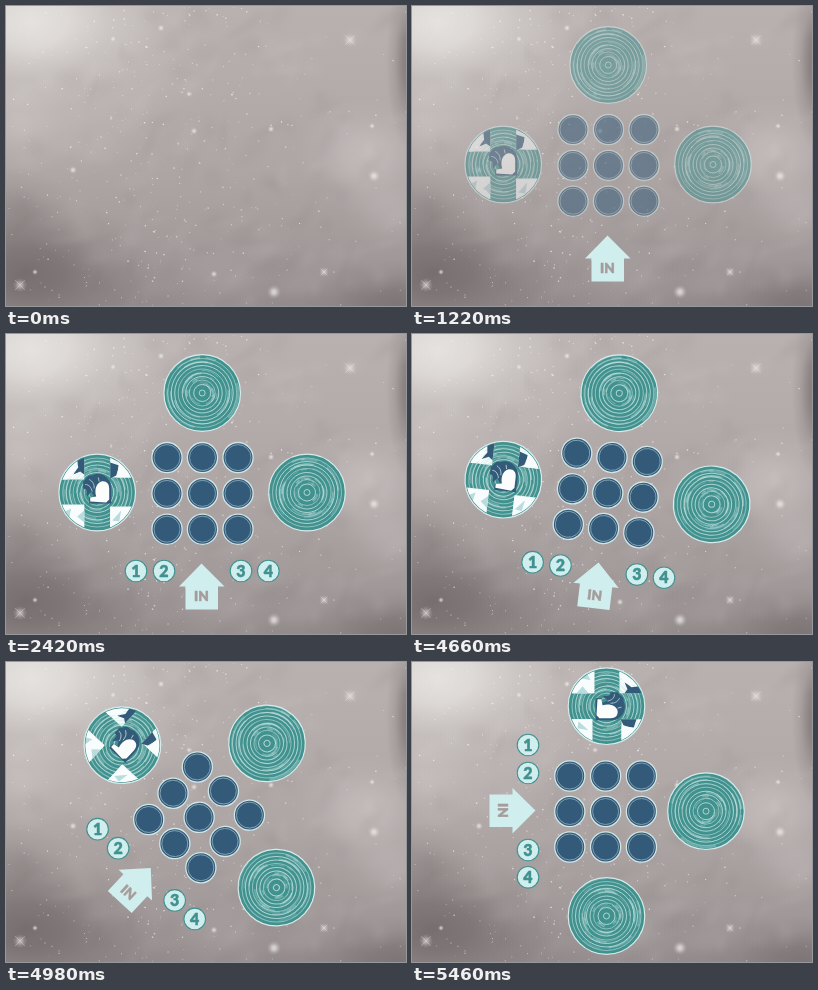
Write an HTML page with a canvas that moves like this. It is 400x300 px and loops after 8 s.

```html
<!DOCTYPE html>
<html lang="en">
<head>
<meta charset="utf-8">
<title>Turning board</title>
<style>
  html, body { margin: 0; width: 100%; height: 100%; overflow: hidden; background: #aca4a4; }
  canvas, svg { position: absolute; left: 0; top: 0; width: 100%; height: 100%; display: block; }
  text { font-family: Lato, "Open Sans", sans-serif; font-weight: 900; text-anchor: middle; }
</style>
</head>
<body>
<canvas id="sky" width="400" height="300"></canvas>
<svg id="stage" viewBox="0 0 400 300">
  <defs><clipPath id="disc"><circle r="38.3"/></clipPath></defs>
  <g id="board">
    <g id="discs"></g>
    <g id="arrow">
      <path d="M195.5 229.5L218.5 252.5H212V275.5H179.5V252.5H173Z" fill="#d0eeed"/>
      <text x="195.5" y="267.4" font-size="13.6" fill="#a59c9c" stroke="#a59c9c" stroke-width="0.4">IN</text>
    </g>
    <g id="labels"></g>
  </g>
</svg>
<script>
const LOOP = 8000, STEP = 80, OFFSET = 500;
const PIVOT = [200, 153];
const TEAL = '#41918f', NAVY = '#335a78', PALE = '#d0eeed';
const $ = id => document.getElementById(id);

function randomizer(seed) {
  return () => (seed = (seed * 16807) % 2147483647) / 2147483647;
}

function add(parent, tag, attrs) {
  const node = document.createElementNS('http://www.w3.org/2000/svg', tag);
  for (const key in attrs) node.setAttribute(key, attrs[key]);
  return parent.appendChild(node);
}

function paintSky() {
  const ctx = $('sky').getContext('2d');
  const rnd = randomizer(4711);

  const base = ctx.createLinearGradient(0, 0, 0, 300);
  base.addColorStop(0, '#b9b1b0');
  base.addColorStop(0.55, '#aea5a5');
  base.addColorStop(1, '#9a9292');
  ctx.fillStyle = base;
  ctx.fillRect(0, 0, 400, 300);

  function cloud(x, y, rx, ry, rgb, alpha, turn = 0) {
    ctx.save();
    ctx.translate(x, y);
    ctx.rotate(turn);
    ctx.scale(rx, ry);
    const g = ctx.createRadialGradient(0, 0, 0, 0, 0, 1);
    for (const [stop, k] of [[0, 1], [0.3, 0.8], [0.65, 0.27], [1, 0]])
      g.addColorStop(stop, `rgba(${rgb},${alpha * k})`);
    ctx.fillStyle = g;
    ctx.fillRect(-1, -1, 2, 2);
    ctx.restore();
  }

  const light = '240,238,235', dark = '84,76,76';
  [
    [25, 15, 125, 90, light, 0.8],
    [10, 110, 75, 60, light, 0.25],
    [105, 85, 140, 70, light, 0.16, -0.6],
    [110, 15, 90, 60, light, 0.15],
    [360, 150, 70, 60, light, 0.28],
    [385, 205, 50, 40, light, 0.16],
    [20, 265, 130, 75, dark, 0.52],
    [0, 205, 70, 45, dark, 0.2],
    [120, 295, 120, 45, dark, 0.12],
    [404, 55, 24, 90, dark, 0.52],
    [390, 298, 95, 45, dark, 0.4],
    [290, 305, 90, 35, dark, 0.12],
    [210, 270, 60, 40, light, 0.06]
  ].forEach(c => cloud(...c));

  for (let i = 0; i < 160; i++)
    cloud(rnd() * 400, rnd() * 300, 10 + rnd() * 24, 7 + rnd() * 13,
      rnd() < 0.55 ? light : dark, 0.045, rnd() * -1.5);

  // Dust is denser towards the middle and the lower left.
  for (let i = 0; i < 430; i++) {
    const y = rnd() * 300;
    const x = rnd() < 0.65 ? 150 + (rnd() + rnd() - 1) * 160 : rnd() * 400;
    ctx.fillStyle = `rgba(255,255,252,${0.25 + rnd() * 0.5})`;
    const s = 0.6 + rnd() * 0.8;
    ctx.fillRect(x, y, s, s);
  }

  const glow = '240,238,235';
  [[67, 164, 4], [155, 22, 3.5], [107, 33, 3], [183, 88, 3], [188, 125, 3.5], [265, 123, 3.5],
   [366, 120, 3], [29, 266, 3], [208, 268, 3.5], [368, 170, 6], [268, 286, 7]]
    .forEach(([x, y, r]) => cloud(x, y, r, r, glow, 0.75));

  [[344, 34, 7], [14, 279, 7], [318, 266, 5]].forEach(([x, y, r]) => {
    cloud(x, y, r, r, glow, 0.55);
    ctx.strokeStyle = `rgba(${glow},0.35)`;
    ctx.lineWidth = 0.9;
    const d = r * 0.7;
    ctx.beginPath();
    ctx.moveTo(x - d, y - d); ctx.lineTo(x + d, y + d);
    ctx.moveTo(x + d, y - d); ctx.lineTo(x - d, y + d);
    ctx.stroke();
  });
}

function rings(parent, rnd) {
  [3, 8.5, 13, 16.5, 20, 24, 27.5, 31, 34.5].forEach((r, i) =>
    add(parent, 'circle', { r, fill: 'none', stroke: '#d8efec', 'stroke-width': 1, opacity: i % 3 < 2 ? 0.7 : 0.5 }));
  // Worn grooves between the rings
  for (let i = 0; i < 46; i++) {
    const r = 9 + rnd() * 29, from = rnd() * 6.28, to = from + 0.25 + rnd() * 0.8;
    const at = a => `${r * Math.cos(a)} ${r * Math.sin(a)}`;
    add(parent, 'path', {
      d: `M${at(from)}A${r} ${r} 0 0 1 ${at(to)}`, fill: 'none',
      stroke: '#c4e2df', 'stroke-width': 0.8 + rnd() * 1.6, opacity: 0.15 + rnd() * 0.3
    });
  }
}

function bigDisc(x, y, seed, fill = TEAL) {
  const g = add($('discs'), 'g', { transform: `translate(${x} ${y})` });
  add(g, 'circle', { r: 38.3, fill });
  const face = add(g, 'g', { 'clip-path': 'url(#disc)' });
  add(g, 'circle', { r: 38.3, fill: 'none', stroke: '#d5ecea', 'stroke-width': 1.2 });
  return [face, randomizer(seed)];
}

function pictureDisc(x, y) {
  const [face, rnd] = bigDisc(x, y, 77, '#f8fcfc');
  const shape = (d, fill) => add(face, 'path', { d, fill });
  const band = add(face, 'g', {});
  add(band, 'path', { d: 'M-13-40H13V40H-13ZM-40-13H-13V12H-40ZM13-15H40V14H13Z', fill: TEAL });
  rings(band, rnd);
  shape('M-20-33L-13-37V-18L-17-21L-24-18L-19-25ZM13-30L22-27L19-17L13-14Z', NAVY);
  shape('M-38-32H-20L-24-18L-30-13H-40ZM22-34L36-24V-15H20ZM-38 13H-13V38H-30ZM13 15H36L25 36H13Z', '#f8fcfc');
  shape('M-34 20L-26 16L-28 25ZM-20 24L-13 18V30ZM15 28L24 18L22 29Z', '#b9dcdf');
  shape('M-14-11C-10-14-10-18-5-17C0-20 8-18 11-13C14-11 14-6 14 0V11H-8V5L-3 4L-6-1L-10 4L-11-3L-14-4Z', NAVY);
  shape('M-7 9V5L-1 4C-3-3-1-9 4-11C9-12 12-9 12-4V7L9 10Z', '#fbfdfd');
  add(face, 'path', { d: 'M-12-8C-8-8-6-5-5-1M-8-13C-4-11-3-8-3-4M1-15L2-11', fill: 'none', stroke: '#dceeee', 'stroke-width': 0.7 });
  add(face, 'circle', { r: 37.6, fill: 'none', stroke: TEAL, 'stroke-width': 1.1 });
}

function buildBoard() {
  rings(...bigDisc(196.2, 59, 21));
  rings(...bigDisc(301, 158.5, 35));
  pictureDisc(91.2, 158.5);

  for (let i = 0; i < 9; i++) {
    const cx = 161 + (i % 3) * 35.5, cy = 123.6 + Math.floor(i / 3) * 35.8;
    add($('discs'), 'circle', { cx, cy, r: 15.1, fill: NAVY, stroke: '#d0e6e7', 'stroke-width': 1.3 });
    add($('discs'), 'circle', { cx, cy, r: 13, fill: 'none', stroke: '#9dbbc6', 'stroke-width': 0.7 });
  }

  return [130, 158, 235, 262.3].map((x, i) => {
    const g = add($('labels'), 'g', {});
    add(g, 'circle', { r: 10.8, fill: PALE, stroke: TEAL, 'stroke-width': 1.1 });
    add(g, 'text', { y: 5.7, 'font-size': 16, fill: TEAL, stroke: TEAL, 'stroke-width': 0.4 }).textContent = i + 1;
    return { g, x, y: 237 };
  });
}

paintSky();
const labels = buildBoard();
const progress = (t, from, to) => Math.min(1, Math.max(0, (t - from) / (to - from)));

function render(time) {
  const t = OFFSET + Math.floor((time % LOOP - OFFSET) / STEP) * STEP;
  $('arrow').setAttribute('opacity', progress(t, 440, 940));
  $('discs').setAttribute('opacity', progress(t, 900, 1500));
  $('labels').setAttribute('opacity', progress(t, 1900, 2400));

  const angle = 90 * progress(t, 4600, 5400);
  $('board').setAttribute('transform', `rotate(${angle} ${PIVOT})`);
  // Numbers travel with the board but stay upright.
  for (const { g, x, y } of labels)
    g.setAttribute('transform', `translate(${x} ${y}) rotate(${-angle})`);
}

function tick() {
  render(performance.now());
  requestAnimationFrame(tick);
}
tick();
</script>
</body>
</html>
```
